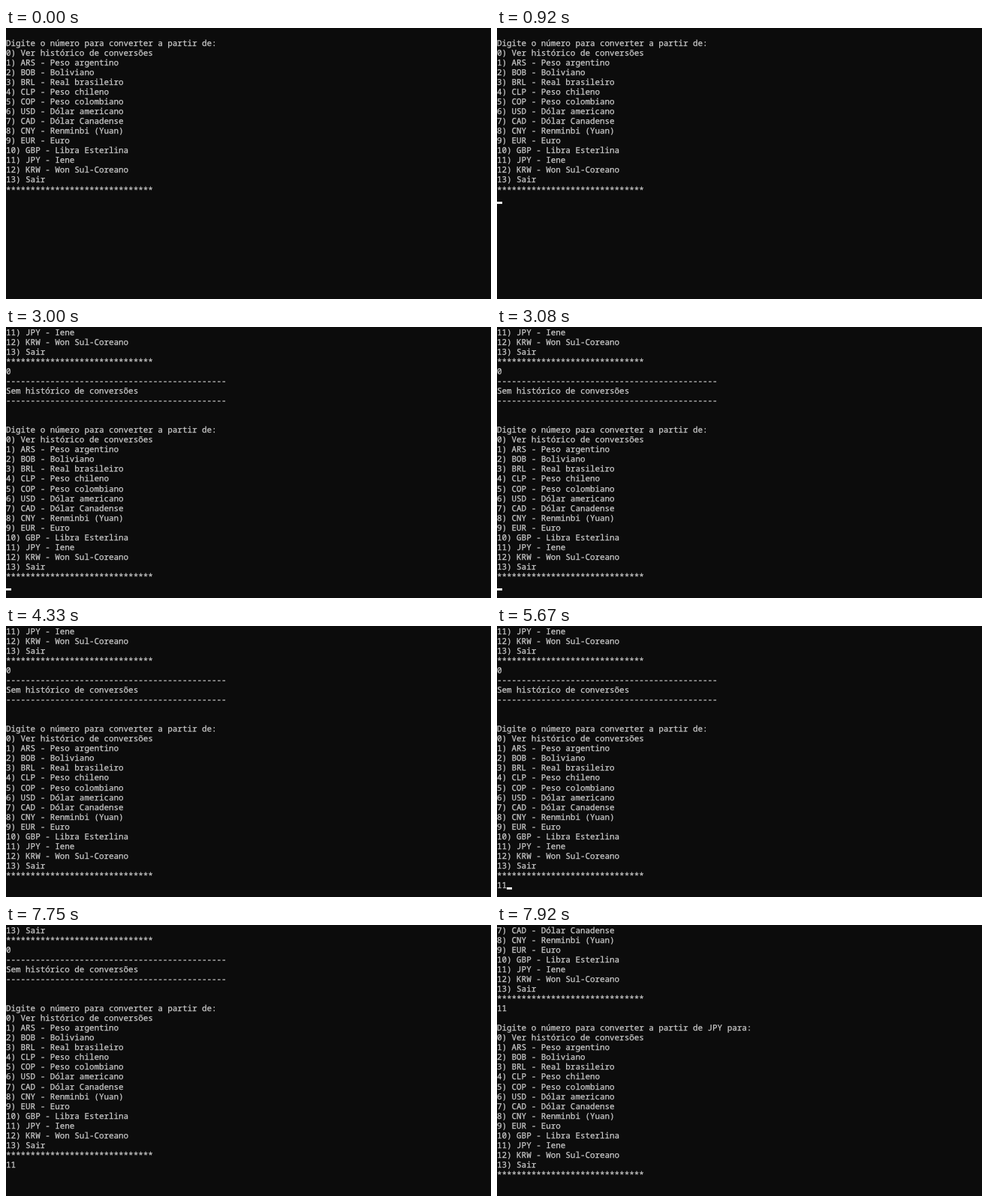
Write an HTML page that moves like this. It is 646 px wide and 362 px high and loops after 8 s.

```html
<!DOCTYPE html>
<html lang="pt">
<head>
<meta charset="utf-8">
<style>
html, body { margin: 0; width: 100%; height: 100%; overflow: hidden; background: #0c0c0c; }
pre {
  position: absolute; left: 0; top: 1px; margin: 0; color: #ccc;
  font: 10.88px/13.03px "Noto Sans Mono", "DejaVu Sans Mono", monospace;
  text-rendering: geometricPrecision; font-variant-ligatures: none;
  -webkit-text-stroke: 0.25px #ccc;
}
#cursor { position: absolute; width: 6.53px; height: 3px; background: #f2f2f2; }
</style>
</head>
<body>
<pre id="screen"></pre>
<div id="cursor"></div>
<script>
const LOOP = 8000, CHAR = 6.53, ROW = 13.03;
const options = ['Ver histórico de conversões', 'ARS - Peso argentino', 'BOB - Boliviano',
  'BRL - Real brasileiro', 'CLP - Peso chileno', 'COP - Peso colombiano', 'USD - Dólar americano',
  'CAD - Dólar Canadense', 'CNY - Renminbi (Yuan)', 'EUR - Euro', 'GBP - Libra Esterlina',
  'JPY - Iene', 'KRW - Won Sul-Coreano', 'Sair'];
const menu = (from = '') => [
  `Digite o número para converter a partir de${from}:`,
  ...options.map((name, i) => `${i}) ${name}`),
  '*'.repeat(30)
];
const rule = '-'.repeat(45);

const first = ['', ...menu()];
const second = [...first, '0', rule, 'Sem histórico de conversões', rule, '', '', ...menu()];
const third = [...second, '11', '', ...menu(' JPY para')];

// [start, printed lines, typed input, first visible line]
const states = [
  [0, first, '', 0],
  [2000, first, '0', 0],
  [2500, second, '', 13],
  [5330, second, '1', 13],
  [5670, second, '11', 13],
  [6330, [...second, '11', ''], '', 15],
  [7920, third, '', 31]
];

// Cursor starts hidden and flips at each time.
const blinks = [920, 1420, 1920, 2500, 2690, 3250, 3750, 4250, 4830, 5830, 6170, 6700, 7210, 7740];

const screen = document.getElementById('screen');
const cursor = document.getElementById('cursor');
let shown;

function draw(now) {
  const t = now % LOOP;
  const state = states.findLast(s => s[0] <= t);
  const [, lines, input, top] = state;
  if (state !== shown) {
    screen.textContent = [...lines, input].slice(top).join('\n');
    cursor.style.left = input.length * CHAR + 'px';
    cursor.style.top = (lines.length - top + 1) * ROW - 2.7 + 'px';
    shown = state;
  }
  const on = blinks.filter(b => b <= t).length % 2;
  cursor.style.visibility = on ? 'visible' : 'hidden';
  requestAnimationFrame(draw);
}
draw(0);
</script>
</body>
</html>
```
